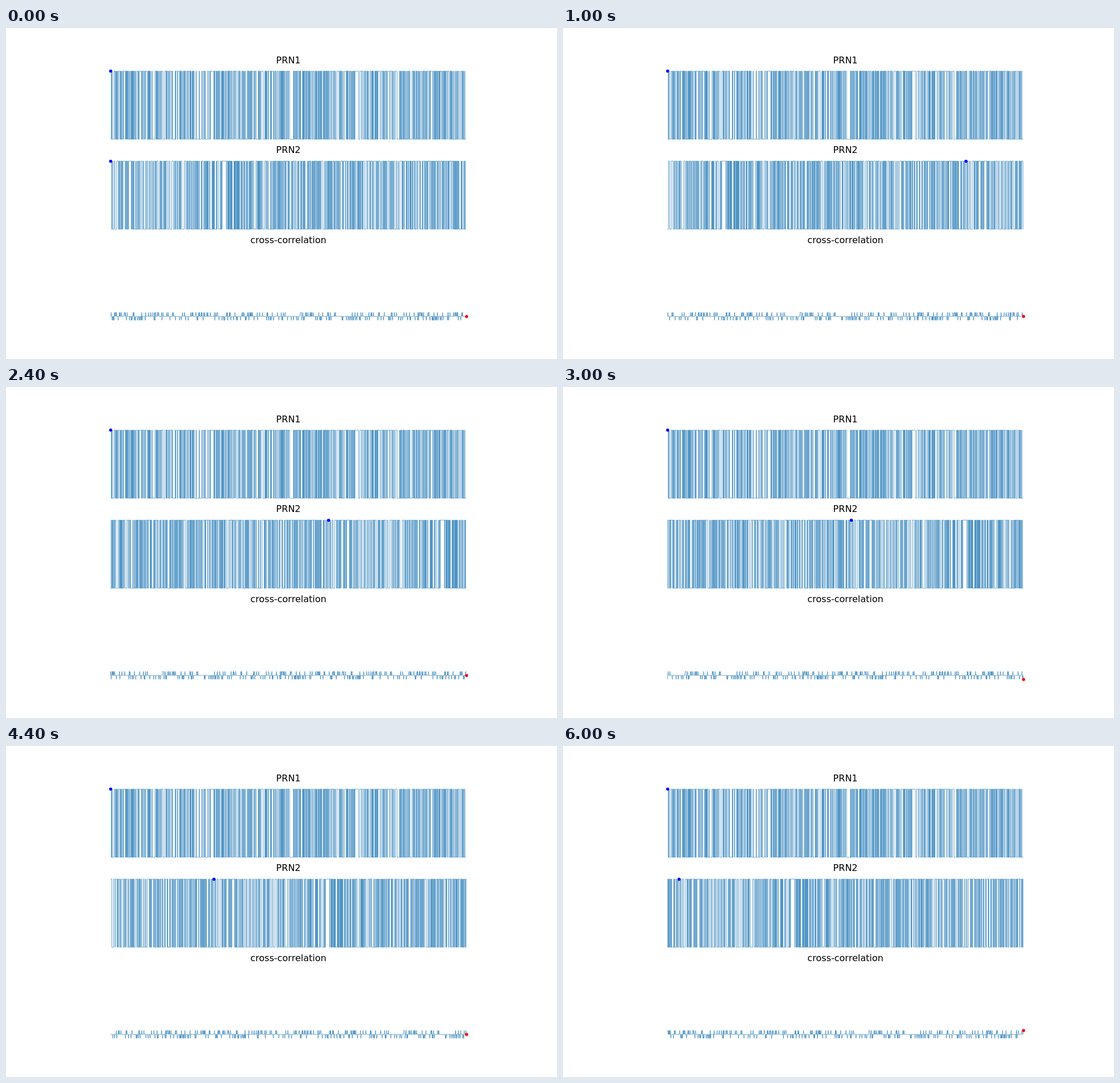
These frames come from a looping animation (966 px wide and 580 px high, 6.2 s). An HTML page with a canvas:

```html
<!DOCTYPE html>
<html>
<head>
<meta charset="utf-8">
<title>Cross-correlation of two pseudo-random codes</title>
<style>
html, body { margin: 0; width: 100%; height: 100%; overflow: hidden; background: #fff; }
canvas { display: block; }
</style>
</head>
<body>
<canvas id="stage" width="966" height="580"></canvas>
<script>
const N = 1023, STEPS = 31, STEP_MS = 200, CHIPS_PER_STEP = N / STEPS;
const LEFT = 183.14, WIDTH = 623.87, CENTER = 495.07;
const AXES_TOP = 69.6, PITCH = 157.62;
const ctx = document.getElementById('stage').getContext('2d');

// Gold code from two 10-stage shift registers; the tap pair selects the code.
function goldCode(tapA, tapB) {
  const g1 = Array(10).fill(1), g2 = Array(10).fill(1);
  const tap = (reg, ...stages) => stages.reduce((sum, k) => sum ^ reg[k - 1], 0);
  const shift = (reg, bit) => { reg.pop(); reg.unshift(bit); };
  return Array.from({ length: N }, () => {
    const chip = g1[9] ^ tap(g2, tapA, tapB);
    shift(g1, tap(g1, 3, 10));
    shift(g2, tap(g2, 2, 3, 6, 8, 9, 10));
    return chip;
  });
}

const code1 = goldCode(2, 6), code2 = goldCode(3, 7);

// Normalised circular correlation for every lag.
const correlation = code1.map((_, lag) =>
  code1.reduce((sum, chip, n) => sum + (chip === code2[(n + lag) % N] ? 1 : -1), 0) / N);

const xAt = i => LEFT + i * WIDTH / N;
const corrY = value => 505.2 - value * 109.46;

function strokeLine(points) {
  ctx.beginPath();
  for (const [x, y] of points) ctx.lineTo(x, y);
  ctx.stroke();
}

function dot(x, y, color) {
  ctx.fillStyle = color;
  ctx.beginPath();
  ctx.arc(Math.floor(x) + 0.5, Math.floor(y) + 0.5, 2.67, 0, 2 * Math.PI);
  ctx.fill();
}

function title(text, row) {
  ctx.fillStyle = '#000';
  ctx.fillText(text, CENTER, AXES_TOP + row * PITCH - 8);
}

function drawCode(name, code, row, shift) {
  const high = AXES_TOP + row * PITCH + 5.97, low = high + 119.4;
  const points = [];
  for (let i = 0; i < N; i++) {
    const y = code[(i + shift) % N] ? high : low;
    points.push([xAt(i), y], [xAt(i + 1), y]);
  }
  title(name, row);
  strokeLine(points);
  dot(xAt((N - shift) % N), high, '#00f');
}

function drawCorrelation(shift) {
  const points = [];
  for (let i = 0; i <= N; i++) points.push([xAt(i), corrY(correlation[(i + shift) % N])]);
  title('cross-correlation', 2);
  strokeLine(points);
  dot(...points[N], '#f00');
}

function draw(step) {
  const shift = step * CHIPS_PER_STEP;
  ctx.fillStyle = '#fff';
  ctx.fillRect(0, 0, 966, 580);
  ctx.font = '16px "DejaVu Sans", sans-serif';
  ctx.textAlign = 'center';
  ctx.strokeStyle = '#1f77b4';
  ctx.lineWidth = 0.67;
  ctx.lineJoin = 'round';
  drawCode('PRN1', code1, 0, 0);
  drawCode('PRN2', code2, 1, shift);
  drawCorrelation(shift);
}

const start = performance.now();
let shown = -1;
function tick() {
  const step = Math.floor((performance.now() - start) / STEP_MS) % STEPS;
  if (step !== shown) draw(shown = step);
  requestAnimationFrame(tick);
}
tick();
</script>
</body>
</html>
```
